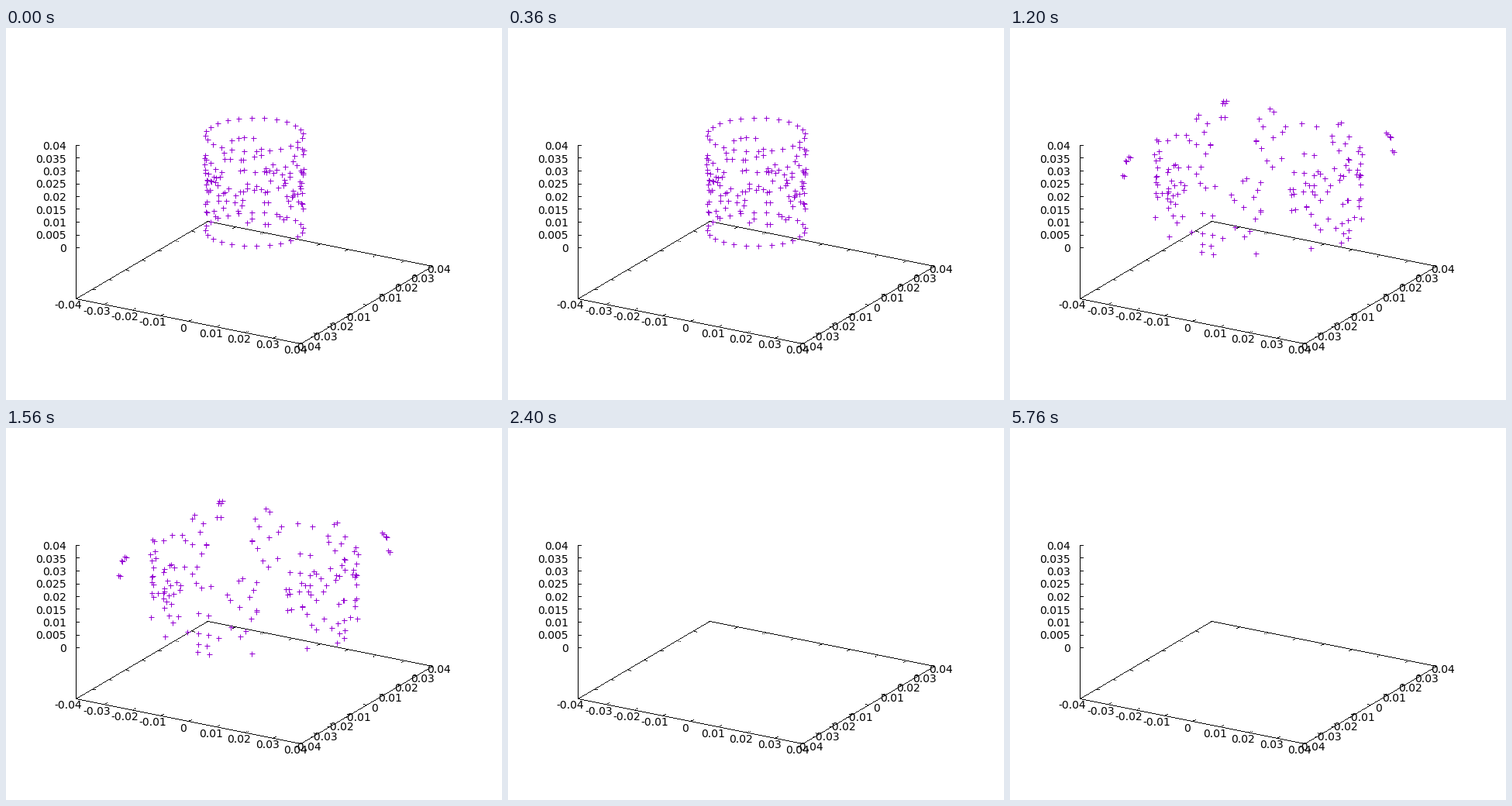
A matplotlib script for the animation above (8 s loop, 640 by 480 pixels).

```python
import numpy as np
import matplotlib.pyplot as plt
from matplotlib.animation import FuncAnimation

DPI = 100
PX = 72 / DPI
PURPLE = "#9400d3"
STEP, HOLD, FRAMES = 200, 600, 40

fig = plt.figure(figsize=(6.4, 4.8), dpi=DPI, facecolor="white")
ax = fig.add_axes([0, 0, 1, 1])
ax.set_xlim(0, 640)
ax.set_ylim(480, 0)
ax.axis("off")
rng = np.random.default_rng(4)


def project(x, y, z):
    """Scene units of 0.01 to stage pixels."""
    return 320 + 36.25 * x + 21.25 * y, 263 + 7.25 * x - 12.5 * y - 33 * z


def line(x0, y0, x1, y1):
    """Hard-edged line, one pixel wide."""
    n = int(round(max(abs(x1 - x0), abs(y1 - y0)))) + 1
    ax.plot(np.round(np.linspace(x0, x1, n)), np.round(np.linspace(y0, y1, n)),
            ",", color="black", zorder=1)


def label(x, y, value, ha="center"):
    ax.text(x, y, f"{value:g}", ha=ha, va="center_baseline", color="black",
            family="DejaVu Sans", size=14 * PX)


def draw_axes():
    corners = [project(*c, -2) for c in ((-4, -4), (4, -4), (4, 4), (-4, 4))]
    for p, q in zip(corners, corners[1:] + corners[:1]):
        line(*p, *q)
    line(*corners[0], *project(-4, -4, 4))
    for k in range(-4, 5):
        for x, y, dx, dy in ((k, -4, 4, -2), (k, 4, -4, 2),
                             (-4, k, 4, 1), (4, k, -4, -1)):
            px, py = project(x, y, -2)
            line(px, py, px + dx, py + dy)
        px, py = project(k, -4, -2)
        label(px - (9.5 if k < 0 else 6.5), py + 7, k / 100)
        px, py = project(4, k, -2)
        label(px + (10.5 if k == 0 else 9), py + 2, k / 100)
    for k in range(9):
        px, py = project(-4, -4, k / 2)
        line(px, py, px + 4, py)
        label(78, py - 0.5, k / 200, "right")


def orbit(points):
    """All mirror images of the points under the symmetry of a square."""
    x, y, z = np.transpose(points)
    return np.vstack([np.column_stack([sx * p, sy * q, z])
                      for p, q in ((x, y), (y, x))
                      for sx in (1, -1) for sy in (1, -1)])


def polar(r, a, z):
    parts = np.broadcast_arrays(r * np.cos(a), r * np.sin(a), z)
    return np.column_stack([p.ravel() for p in parts])


def spray(n, radius, low, high):
    """Random drops on an upright cylinder, mirrored eight ways."""
    return orbit(polar(radius + rng.normal(0, 0.03, n),
                       rng.uniform(0, np.pi / 4, n),
                       rng.uniform(low, high, n)))


def corner_spray(n):
    return orbit(np.column_stack([rng.uniform(2.85, 3.1, (n, 2)),
                                  rng.uniform(2.2, 3.6, n)]))


def sheet(rim=2.8, half=3.02, top=2.3, fall=0.95):
    """Square sheet with a round hole, sinking towards its corners."""
    a, u = np.meshgrid(np.linspace(0, 2 * np.pi, 160, endpoint=False),
                       np.linspace(0, 1, 19))
    edge = half / np.maximum(abs(np.cos(a)), abs(np.sin(a)))
    r = rim + (edge - rim) * u
    s = np.clip((r - rim) / fall, 0, 1)
    return polar(r, a, top * (1 + np.cos(np.pi * s)) / 2)


def lips():
    """Scallops hanging inside the rim at the middle of each side."""
    t = np.linspace(0, 1, 7)
    drop = 1.3 - t ** 2
    return orbit(polar(2.8 - 0.25 * drop, 0.22 * t, 2.3 - drop))


def column():
    a = np.linspace(0, 2 * np.pi, 24, endpoint=False) + 0.06
    return np.vstack([polar(1.5, a, 3.8), polar(1.5, a, 0.1),
                      spray(15, 1.5, 0.4, 3.2)])


def crown():
    return np.vstack([sheet(), lips(), spray(3, 2.5, 0.1, 0.8)])


def ring():
    return np.vstack([spray(20, 3.13, 0, 3.7), corner_spray(3)])


def remnants():
    drops = orbit([(2.7, 2.7, 3.9), (2.69, 2.61, 0.36), (2.8, 2.5, 0.69),
                   (2.16, 1.46, 1.75)])
    far = orbit([(2.92, 2.4, 1.33)])
    return np.vstack([drops, far[far[:, 0] + far[:, 1] > 0]])


stages = [column(), crown(), ring(), remnants(), np.empty((0, 3))]

draw_axes()
marks, = ax.plot([], [], "+", color=PURPLE, ms=7 * PX, mew=PX, zorder=2,
                 antialiased=False)


def update(i):
    stage = stages[min(i * STEP // HOLD, len(stages) - 1)]
    marks.set_data(*np.round(project(*stage.T)))
    return marks,


anim = FuncAnimation(fig, update, frames=FRAMES, interval=STEP,
                     repeat=True, repeat_delay=0, blit=False)
plt.show()
```
